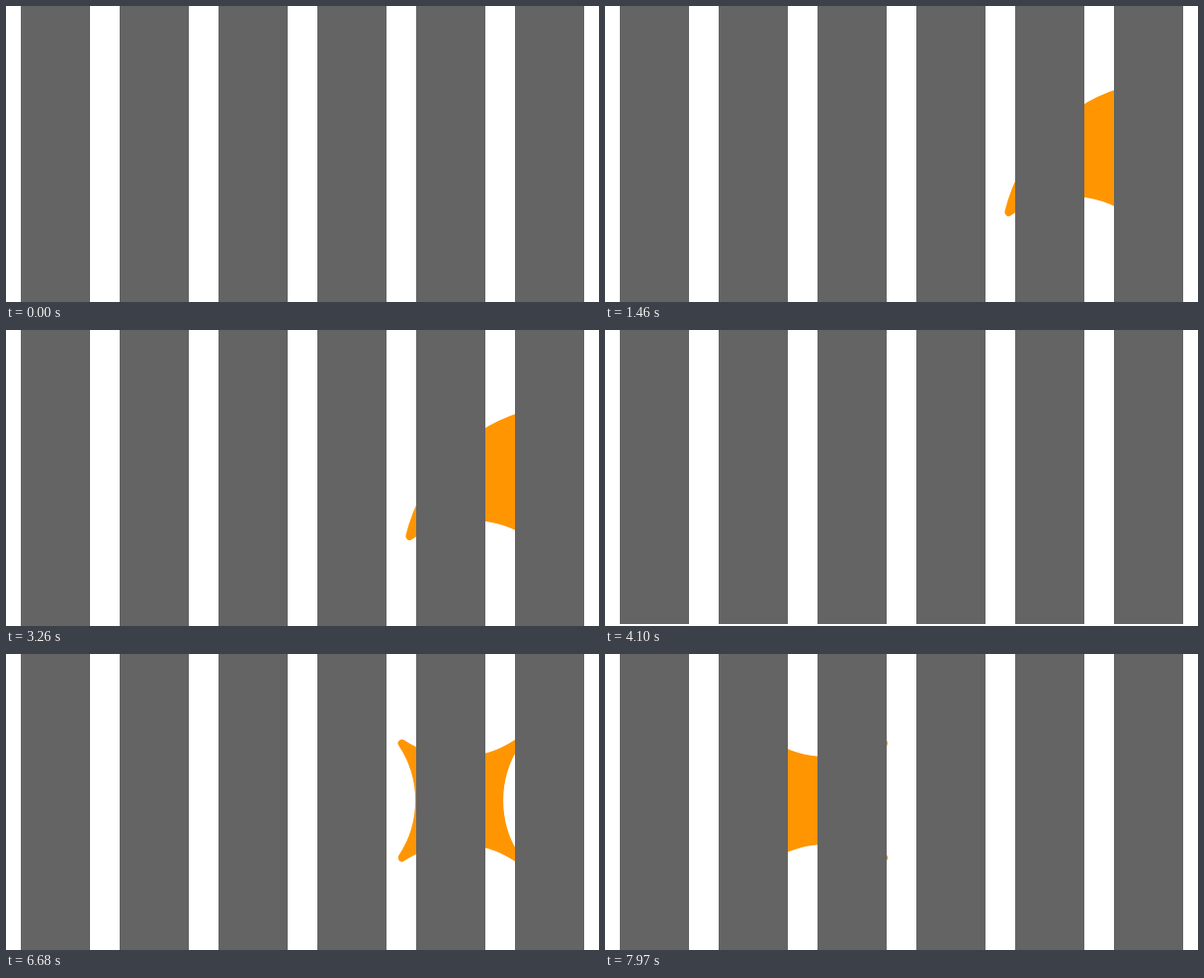
An HTML page with a canvas for the animation above (8000 ms loop, 600 by 300 pixels).

```html
<!DOCTYPE html>
<html lang="en">
<head>
<meta charset="utf-8">
<title>Shapes behind bars</title>
<style>
html, body { margin: 0; width: 100%; height: 100%; overflow: hidden; background: #fff; }
canvas { display: block; }
</style>
</head>
<body>
<canvas id="stage" width="600" height="300"></canvas>
<script>
const ctx = document.getElementById('stage').getContext('2d');
const LOOP = 8000, STEP = 30;
const LEG = 30;            // steps from one side to the other
const PASS = 4 * LEG * STEP; // two round trips

// Rounded-tip outlines: arcs between corners, thickened by a round stroke.
const wedge = {
  dx: -1.5, y: 146.5,
  path: new Path2D('M-62.5 62.5 A170 170 0 0 1 62.5 -62.5' +
    'A107.2 107.2 0 0 0 62.5 62.5 A107.2 107.2 0 0 0 -62.5 62.5Z')
};
const star = {
  dx: 0, y: 148.5,
  path: new Path2D('M-58 -58 A104.9 104.9 0 0 0 58 -58 A104.9 104.9 0 0 0 58 58' +
    'A104.9 104.9 0 0 0 -58 58 A104.9 104.9 0 0 0 -58 -58Z')
};
const passes = [{ start: 500, shape: wedge }, { start: 5900, shape: star }];

// Even steps from 100 to 500 and back, resting one extra step at each end.
function shapeX(time) {
  const k = Math.floor(time / STEP) % (2 * LEG);
  const i = k < LEG ? k : 2 * LEG - 1 - k;
  return 100 + 400 * i / (LEG - 1);
}

function drawShape(shape, x) {
  ctx.save();
  ctx.translate(x + shape.dx, shape.y);
  ctx.fillStyle = ctx.strokeStyle = '#ff9500';
  ctx.lineWidth = 8;
  ctx.lineJoin = 'round';
  ctx.fill(shape.path);
  ctx.stroke(shape.path);
  ctx.restore();
}

function drawBars(height) {
  ctx.fillStyle = '#646464';
  for (let x = 15; x < 600; x += 100) ctx.fillRect(x, 0, 70, height);
}

function draw(t) {
  ctx.fillStyle = '#fff';
  ctx.fillRect(0, 0, 600, 300);
  for (const { start, shape } of passes) {
    if (t >= start && t < start + PASS) drawShape(shape, shapeX(t - start));
  }
  drawBars(t >= 4100 && t < 5900 ? 298 : 300);
}

const origin = performance.now();
function tick() {
  draw((performance.now() - origin) % LOOP);
  requestAnimationFrame(tick);
}
tick();
</script>
</body>
</html>
```
